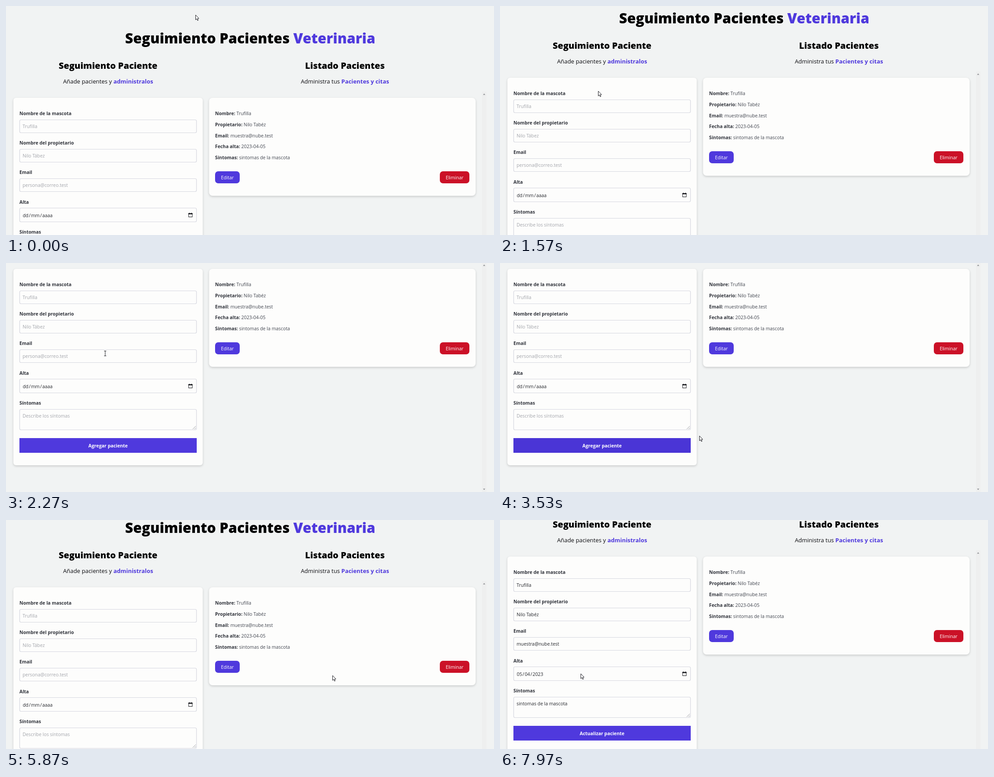
Recreate the animation shown at these times as an HTML page with a canvas. Size 1090x514 px, loop 8 s.

```html
<!DOCTYPE html>
<html lang="es">
<head>
<meta charset="utf-8">
<title>Seguimiento Pacientes Veterinaria</title>
<style>
html, body { margin: 0; width: 100%; height: 100%; overflow: hidden; background: #f1f3f3; }
canvas { display: block; width: 1090px; height: 514px; }
</style>
</head>
<body>
<canvas id="stage" width="1090" height="514"></canvas>
<script>
const ctx = document.getElementById('stage').getContext('2d');
const LOOP = 8000;
const CLICK = 6900;
const FAMILY = '"Open Sans", "Noto Sans", sans-serif';
const BODY = 10.35;

const BG = '#f1f3f3', CARD = '#fdfdfc', BORDER = '#d5d6df';
const INDIGO = [79, 57, 221], INDIGO_DARK = [66, 46, 203], RED = [203, 17, 39];
const INK = '#30333b', VALUE = '#41454f', FIELD_TEXT = '#24262c', HINT = '#a3a5ab';

const PET = 'Trufilla', OWNER = 'Nilo Tabéz', MAIL = 'muestra@nube.test';
const SYMPTOMS = 'sintomas de la mascota';

// Page coordinates: label baseline, box top, box height
const FIELDS = [
  { label: 'Nombre de la mascota', base: 245, y: 255, h: 30, hint: 'Trufilla', value: PET },
  { label: 'Nombre del propietario', base: 311, y: 321, h: 30, hint: 'Nilo Tábez', value: OWNER },
  { label: 'Email', base: 377, y: 387, h: 30, hint: 'persona@correo.test', value: MAIL },
  { label: 'Alta', base: 444, y: 453, h: 32, date: true },
  { label: 'Síntomas', base: 511, y: 521, h: 47, hint: 'Describe los síntomas', value: SYMPTOMS, area: true }
];
const ROWS = [
  ['Nombre:', PET], ['Propietario:', OWNER], ['Email:', MAIL],
  ['Fecha alta:', '2023-04-05'], ['Síntomas:', SYMPTOMS]
];
const SUBMIT = { x: 30, y: 586, w: 396, h: 33 };
const EDIT = { x: 467, y: 371, w: 55, h: 27 };
const REMOVE = { x: 969, y: 371, w: 66, h: 27 };

// Wheel ticks: start time, distance
const TICKS = [
  [762, 69], [1539, -69], [1760, 69], [1930, 69], [2080, 55],
  [4497, -69], [4760, -69], [7700, 69]
];
// Pointer path: time, x, y
const PATH = [
  [0, 423, 20], [350, 330, 90], [700, 222, 188], [1570, 219, 191],
  [2270, 221, 203], [2500, 221, 205], [2900, 250, 405], [3250, 330, 412],
  [3530, 445, 388], [4150, 470, 342], [4630, 471, 328], [5000, 480, 325],
  [5480, 838, 312], [5700, 820, 345], [5830, 767, 349], [5870, 730, 349],
  [6150, 545, 340], [6400, 486, 333], [7500, 484, 331], [8000, 160, 346]
];

const clamp = v => Math.max(0, Math.min(1, v));
const easeOut = p => 1 - (1 - p) ** 2;
const rgb = c => `rgb(${c.map(Math.round).join(',')})`;
const mix = (a, b, k) => a.map((v, i) => v + (b[i] - v) * k);
const inside = (b, x, y) => x >= b.x && x < b.x + b.w && y >= b.y && y < b.y + b.h;

function scrollAt(t) {
  return Math.round(TICKS.reduce((s, [start, d]) => s + d * easeOut(clamp((t - start) / 170)), 0));
}

// Monotone cubic through the path points
function pointerAt(t) {
  let i = PATH.findIndex(p => p[0] > t) - 1;
  if (i < 0) i = 0;
  const a = PATH[i], b = PATH[i + 1], dt = b[0] - a[0], u = (t - a[0]) / dt;
  const slope = (n, k) => (PATH[n + 1][k] - PATH[n][k]) / (PATH[n + 1][0] - PATH[n][0]);
  const tangent = (n, k) => {
    if (n === 0) return slope(0, k);
    if (n === PATH.length - 1) return slope(n - 1, k);
    const p = slope(n - 1, k), q = slope(n, k);
    return p * q <= 0 ? 0 : 2 * p * q / (p + q);
  };
  const axis = k => {
    const h = u * u * (3 - 2 * u);
    return a[k] + (b[k] - a[k]) * h
      + dt * (u * (1 - u) ** 2 * tangent(i, k) - u * u * (1 - u) * tangent(i + 1, k));
  };
  return { x: axis(1), y: axis(2) };
}

function hits(box, t) {
  const p = pointerAt(t);
  return inside(box, p.x, p.y + scrollAt(t));
}

// Colour fade over 150 ms
function hover(box, t) {
  let n = 0;
  for (let k = 0; k < 5; k++) if (hits(box, Math.max(0, t - k * 30))) n++;
  return n / 5;
}

function setFont(size, weight) {
  ctx.font = `${weight} ${size}px ${FAMILY}`;
}

function text(str, x, y, color, size = BODY, weight = 400, align = 'left') {
  setFont(size, weight);
  ctx.textAlign = align;
  ctx.fillStyle = color;
  ctx.fillText(str, x, y);
  return ctx.measureText(str).width;
}

// Two runs of text centred as one line
function pair(cx, y, size, first, second, w1, w2, color) {
  setFont(size, w1);
  const a = ctx.measureText(first).width;
  setFont(size, w2);
  const x = cx - (a + ctx.measureText(second).width) / 2;
  text(first, x, y, color, size, w1);
  text(second, x + a, y, rgb(INDIGO), size, w2);
}

function box(x, y, w, h, r, fill) {
  ctx.beginPath();
  ctx.roundRect(x, y, w, h, r);
  ctx.fillStyle = fill;
  ctx.fill();
}

function line(points, close) {
  ctx.beginPath();
  points.forEach(([x, y], i) => i ? ctx.lineTo(x, y) : ctx.moveTo(x, y));
  if (close) ctx.closePath();
}

function card(x, y, w, h, r) {
  ctx.save();
  ctx.shadowColor = 'rgba(0,0,0,.17)';
  ctx.shadowBlur = 5;
  ctx.shadowOffsetY = 2;
  box(x, y, w, h, r, CARD);
  ctx.restore();
}

function button(b, r, label, base, color, weight) {
  box(b.x, b.y, b.w, b.h, r, rgb(color));
  text(label, b.x + b.w / 2, base, '#fff', BODY, weight, 'center');
}

function dateField(f, filled) {
  const parts = filled ? ['05', '/', '04', '/', '2023'] : ['dd', '/', 'mm', '/', 'aaaa'];
  let x = 36.5;
  for (const part of parts) {
    const pad = part === '/' ? 0 : 1;
    x += pad + text(part, x + pad, f.y + 20.5, FIELD_TEXT) + pad;
  }
  ctx.strokeStyle = '#15161a';
  ctx.lineWidth = 1;
  ctx.strokeRect(408, f.y + 12.5, 8, 8);
  ctx.fillStyle = '#15161a';
  ctx.fillRect(407.5, f.y + 12, 9, 2.5);
  ctx.fillRect(409, f.y + 11, 1, 1);
  ctx.fillRect(414, f.y + 11, 1, 1);
}

function field(f, filled) {
  text(f.label, 30, f.base, INK, BODY, 700);
  ctx.beginPath();
  ctx.roundRect(30.5, f.y + .5, 395, f.h - 1, 3);
  ctx.strokeStyle = BORDER;
  ctx.lineWidth = 1.2;
  ctx.stroke();
  if (f.date) return dateField(f, filled);
  text(filled ? f.value : f.hint, 37, f.y + 19, filled ? FIELD_TEXT : HINT);
  if (f.area) {
    const bottom = f.y + f.h - 2;
    ctx.strokeStyle = '#85878c';
    ctx.lineWidth = .8;
    for (const d of [7, 3]) {
      line([[424 - d, bottom], [424, bottom - d]]);
      ctx.stroke();
    }
  }
}

function form(t) {
  const filled = t >= CLICK;
  card(16.5, 206, 423, 447 - 6, 6);
  FIELDS.forEach(f => field(f, filled));
  button(SUBMIT, 0, filled ? 'Actualizar paciente' : 'Agregar paciente', 606.5,
    mix(INDIGO, INDIGO_DARK, hover(SUBMIT, t)), 700);
}

function list(t) {
  ctx.fillStyle = '#eeefef';
  ctx.fillRect(1063, 192, 10, 515);
  ctx.fillStyle = '#8c8e91';
  line([[1065.5, 199.5], [1068, 196.5], [1070.5, 199.5]], true);
  ctx.fill();
  line([[1065.5, 699.5], [1068, 702.5], [1070.5, 699.5]], true);
  ctx.fill();

  card(453.5, 206, 595.5, 220, 8);
  ROWS.forEach(([name, value], i) => {
    const y = Math.round(245 + i * 24.8);
    const w = text(name + ' ', 467, y, INK, BODY, 700);
    text(value, 467 + w, y, VALUE);
  });
  button(EDIT, 7, 'Editar', 388.5, mix(INDIGO, INDIGO_DARK, hover(EDIT, t)), 400);
  button(REMOVE, 7, 'Eliminar', 388.5, RED, 400);
}

function outlined(points) {
  line(points, true);
  ctx.fillStyle = '#fff';
  ctx.fill();
  ctx.strokeStyle = '#1c1c22';
  ctx.lineWidth = 1;
  ctx.lineJoin = 'round';
  ctx.stroke();
}

function arrow() {
  outlined([[.5, 0], [.5, 11], [3, 8.7], [4.8, 12.7], [6.4, 12], [4.7, 8.1], [8, 8]]);
}

function beam() {
  ctx.strokeStyle = '#25262b';
  ctx.lineWidth = 1;
  line([[-2, -5.5], [3, -5.5]]);
  ctx.stroke();
  line([[.5, -5.5], [.5, 5.5]]);
  ctx.stroke();
  line([[-2, 5.5], [3, 5.5]]);
  ctx.stroke();
}

function hand() {
  outlined([[-1, 0], [1, 0], [1.3, 4.2], [6, 5.2], [7.3, 6.5], [7, 9.5], [5.5, 13],
    [-.5, 13], [-4, 8.5], [-3.6, 7.2], [-1, 8.4]]);
}

function pointer(t, scroll) {
  const p = pointerAt(t), py = p.y + scroll;
  const onText = FIELDS.some(f => !f.date && inside({ x: 30, y: f.y, w: 396, h: f.h }, p.x, py));
  const onButton = [SUBMIT, EDIT, REMOVE].some(b => inside(b, p.x, py));
  ctx.save();
  ctx.translate(Math.round(p.x), Math.round(p.y));
  if (onText) beam();
  else if (onButton) hand();
  else arrow();
  ctx.restore();
}

function draw(t) {
  const scroll = scrollAt(t);
  ctx.fillStyle = BG;
  ctx.fillRect(0, 0, 1090, 514);
  ctx.save();
  ctx.translate(0, -scroll);
  pair(545.5, 84, 31.2, 'Seguimiento Pacientes ', 'Veterinaria', 800, 800, '#000');
  text('Seguimiento Paciente', 228, 140.5, '#000', 19.6, 800, 'center');
  pair(228, 173.5, 12.9, 'Añade pacientes y ', 'administralos', 400, 700, '#0c0c10');
  text('Listado Pacientes', 757, 140.5, '#000', 19.6, 800, 'center');
  pair(757, 173.5, 12.9, 'Administra tus ', 'Pacientes y citas', 400, 700, '#0c0c10');
  form(t);
  list(t);
  ctx.restore();
  pointer(t, scroll);
}

const begin = performance.now();
function tick() {
  draw((performance.now() - begin) % LOOP);
  requestAnimationFrame(tick);
}
tick();
</script>
</body>
</html>
```
